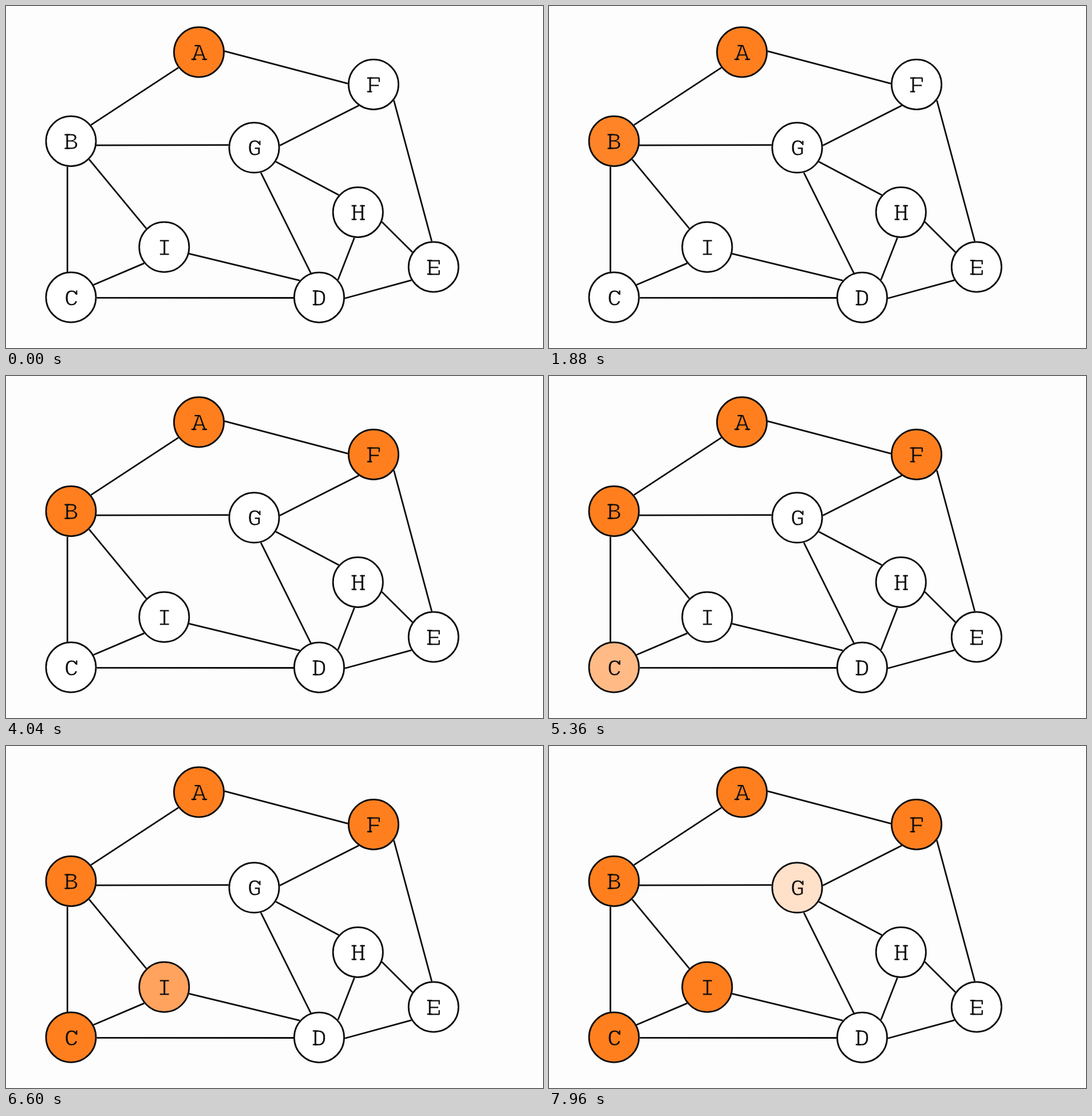
An HTML page with a canvas for the animation above (8000 ms loop, 938 by 597 pixels).

```html
<!DOCTYPE html>
<html lang="en">
<head>
<meta charset="utf-8">
<title>Graph traversal</title>
<style>
  html, body { margin: 0; width: 100%; height: 100%; overflow: hidden; background: #fdfdfd; }
  canvas { display: block; }
</style>
</head>
<body>
<canvas id="stage" width="938" height="597"></canvas>
<script>
const canvas = document.getElementById('stage');
const ctx = canvas.getContext('2d');
const LOOP = 8000, STEP = 40, FADE = 500;
const RADIUS = 43.6, REACH = 45;
const INK = '#0c0c0c', PAPER = [255, 255, 255], ORANGE = [255, 127, 31];
const FONT_SIZE = 41, CAP = FONT_SIZE * 0.33, STEM = FONT_SIZE * 0.18;

// start: when the node begins to fill, in ms
const nodes = {
  A: { x: 337, y: 80.5, start: -FADE },
  B: { x: 113.5, y: 236, start: 1400 },
  C: { x: 113.5, y: 508.5, start: 5090 },
  D: { x: 547, y: 508.7 },
  E: { x: 746.8, y: 455.5 },
  F: { x: 642, y: 137, start: 2250 },
  G: { x: 433.5, y: 247.3, start: 7840 },
  H: { x: 614.8, y: 360 },
  I: { x: 276.3, y: 420.8, start: 6240 }
};

// Each edge joins two rims at the given clockwise angles in degrees
const edges = [
  ['A', 143, 'B', 321], ['A', -2, 'F', 182],
  ['B', 9, 'G', 186], ['B', 98, 'C', 262], ['B', 45, 'I', 226],
  ['C', -29, 'I', 141], ['C', 1, 'D', 179], ['I', 15, 'D', 221],
  ['G', 75, 'D', 251], ['G', 33, 'H', 222], ['G', -5, 'F', 125],
  ['F', 38, 'E', 266], ['H', 98, 'D', 317], ['H', 22, 'E', 215],
  ['D', 2, 'E', 149]
];

function line(x1, y1, x2, y2, width) {
  ctx.lineWidth = width;
  ctx.strokeStyle = INK;
  ctx.beginPath();
  ctx.moveTo(x1, y1);
  ctx.lineTo(x2, y2);
  ctx.stroke();
}

function rimPoint(name, degrees) {
  const angle = degrees * Math.PI / 180;
  const { x, y } = nodes[name];
  return [x + REACH * Math.cos(angle), y + REACH * Math.sin(angle)];
}

function drawEdge([from, leave, to, arrive]) {
  line(...rimPoint(from, leave), ...rimPoint(to, arrive), 2.8);
}

// side and row are -1 or 1: left or right, top or bottom
function slab(side, row, center = STEM) {
  const y = row * (CAP - 1.6);
  line(side * center - 4.3, y, side * center + 4.3, y, 2.3);
}

function tip(row) {
  line(STEM + 2, row * (CAP - 1), STEM + 2, row * 5, 2.3);
}

function drawSerifs(letter) {
  const has = letters => letters.includes(letter);
  for (const row of [-1, 1]) {
    if (has('BDEFH')) slab(-1, row);
    if (has('H')) slab(1, row);
  }
  if (has('A')) {
    slab(-1, 1, STEM + 2);
    slab(1, 1, STEM + 2);
    slab(-1, -1, STEM / 2);
  }
  if (has('CEFG')) tip(-1);
  if (has('E')) tip(1);
}

function drawLetter(letter, fill) {
  ctx.fillStyle = INK;
  ctx.fillText(letter, 0, CAP);
  // Trim the outline to lighten the letter
  ctx.lineWidth = 0.8;
  ctx.strokeStyle = fill;
  ctx.strokeText(letter, 0, CAP);
  drawSerifs(letter);
}

function fillColor(start = Infinity, time) {
  const p = Math.min(1, Math.max(0, (time - start) / FADE));
  return `rgb(${PAPER.map((c, i) => Math.round(c + (ORANGE[i] - c) * p))})`;
}

function drawNode(name, time) {
  const { x, y, start } = nodes[name];
  const fill = fillColor(start, time);
  ctx.save();
  ctx.translate(x, y);
  ctx.beginPath();
  ctx.arc(0, 0, RADIUS, 0, Math.PI * 2);
  ctx.fillStyle = fill;
  ctx.fill();
  ctx.lineWidth = 2.8;
  ctx.strokeStyle = INK;
  ctx.stroke();
  ctx.translate(0.5, 0.6);
  drawLetter(name, fill);
  ctx.restore();
}

function draw(now) {
  const time = Math.floor((now % LOOP) / STEP) * STEP;
  ctx.fillStyle = '#fdfdfd';
  ctx.fillRect(0, 0, canvas.width, canvas.height);
  ctx.font = `${FONT_SIZE}px "Liberation Mono", monospace`;
  ctx.textAlign = 'center';
  ctx.lineJoin = 'round';
  Object.keys(nodes).forEach(name => drawNode(name, time));
  edges.forEach(drawEdge);
}

const origin = performance.now();
function frame() {
  draw(performance.now() - origin);
  requestAnimationFrame(frame);
}
frame();
</script>
</body>
</html>
```
